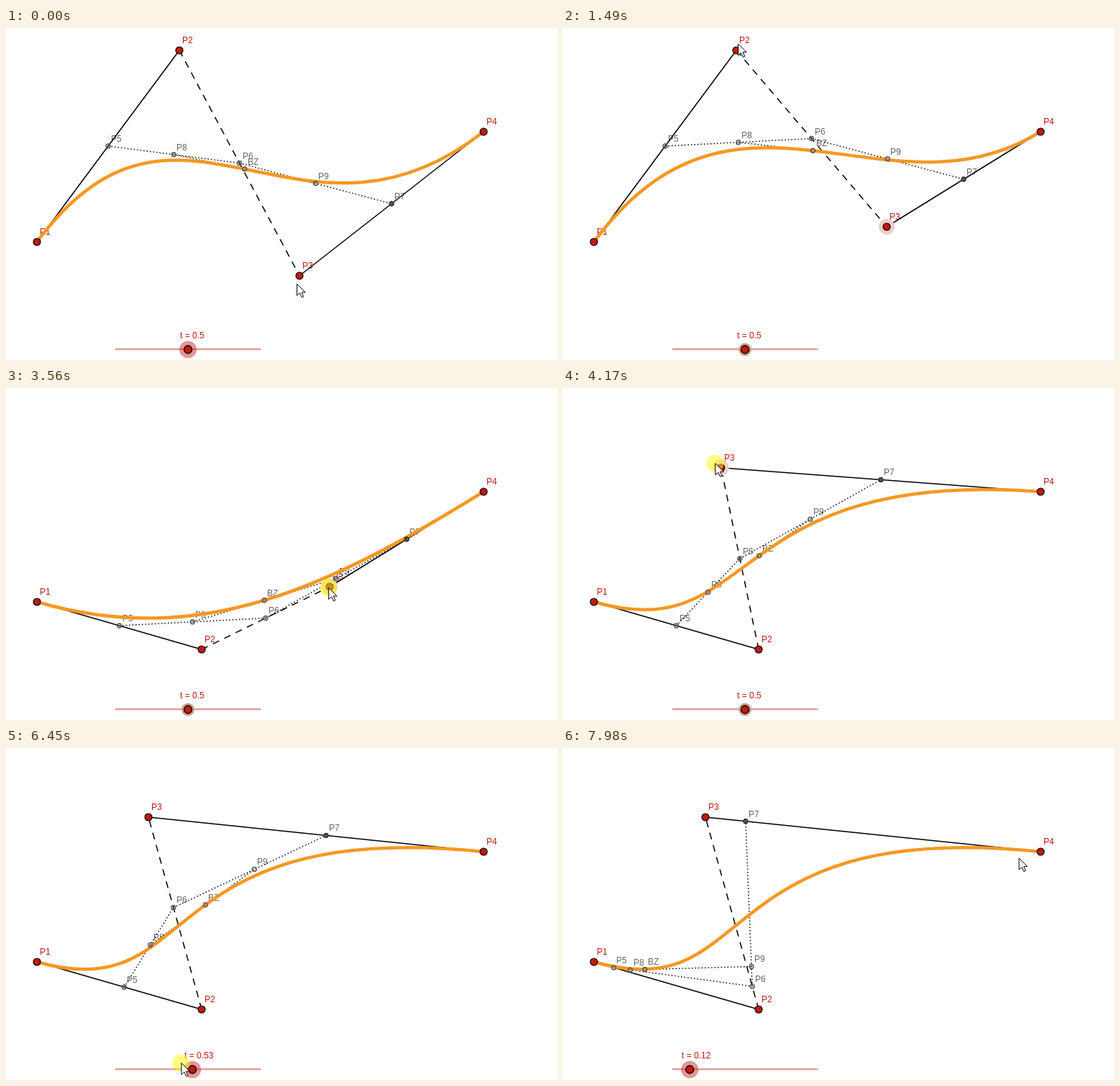
Recreate the animation shown at these times as an HTML page with a canvas. Size 766x461 px, loop 8000 ms.

```html
<!DOCTYPE html>
<html>
<head>
<meta charset="utf-8">
<style>
html, body { margin: 0; width: 100%; height: 100%; overflow: hidden; background: #fff; }
canvas { display: block; }
</style>
</head>
<body>
<canvas id="stage" width="766" height="461"></canvas>
<script>
const ctx = document.getElementById('stage').getContext('2d');
const LOOP = 8000, REST = 150, RED = '#c01a0c', GREY = '#666';
const P1 = [43, 297], P4 = [664, 144];

// Key positions: [ms, value, ...]
const tracks = {
  P2: [[1680, 241, 31], [2540, 255, 316], [2800, 272, 363]],
  P3: [[250, 408, 344], [1100, 450, 276], [3560, 450, 276], [4170, 220, 111], [4320, 198, 96]],
  t: [[5090, .5], [5630, .76], [6005, .84], [6450, .53], [7220, .12]]
};

// The hand runs ahead of the dragged point by `lead` ms and rises by `lift` px
const drags = [
  { name: 'P3', from: 300, to: 1130, lead: 15, dx: 2, dy: 2, lift: 0 },
  { name: 'P2', from: 1640, to: 2880, lead: 15, dx: 2, dy: -9, lift: -11 },
  { name: 'P3', from: 3560, to: 4400, lead: 25, dx: -1, dy: 2, lift: 4 },
  { name: 't', from: 5050, to: 7280, lead: 90, dx: -4, dy: 6, lift: 24 }
];

const smooth = u => u * u * (3 - 2 * u);
const clamp = u => Math.min(1, Math.max(0, u));
const mix = (a, b, t) => a.map((v, i) => v + (b[i] - v) * t);
const knobAt = t => [152 + 202 * t, 446.5];

// Smooth interpolation that never overshoots a turning point
function sample(track, ms) {
  const last = track.length - 1;
  if (ms <= track[0][0]) return track[0].slice(1);
  if (ms >= track[last][0]) return track[last].slice(1);
  const i = track.findIndex(k => k[0] > ms) - 1;
  const a = track[i], b = track[i + 1], h = b[0] - a[0], u = (ms - a[0]) / h;
  const slope = (k, c) => {
    if (k === 0 || k === last) return 0;
    const [p, q, r] = track.slice(k - 1, k + 2);
    return (q[c] - p[c]) * (r[c] - q[c]) <= 0 ? 0 : (r[c] - p[c]) / (r[0] - p[0]);
  };
  return mix(a, b, smooth(u)).map((v, c) =>
    v + h * u * (1 - u) * ((1 - u) * slope(i, c) - u * slope(i + 1, c))).slice(1);
}

function gripAt(drag, ms) {
  const value = sample(tracks[drag.name], ms + drag.lead);
  const [x, y] = drag.name === 't' ? knobAt(value[0]) : value;
  return [x + drag.dx, y + drag.dy - drag.lift * (ms - drag.from) / (drag.to - drag.from)];
}

function glide(a, b, from, to, ms, bend = mix(a, b, .5)) {
  const u = smooth(clamp((ms - from) / (to - from)));
  return mix(mix(a, bend, u), mix(bend, b, u), u);
}

function cursorAt(ms) {
  const held = drags.find(d => ms >= d.from && ms < d.to);
  if (held) return gripAt(held, ms);
  const next = drags.find(d => d.from > ms);
  const prev = drags.filter(d => d.to <= ms).pop();
  const start = prev ? gripAt(prev, prev.to) : [404, 355.5];
  const from = prev ? prev.to : 50;
  if (!next) return glide(start, [633.5, 153], from, 7980, ms, [108, 85]);
  return glide(start, gripAt(next, next.from), from, next.from - REST, ms);
}

function line(a, b, dash = [], color = '#000', width = 1.5) {
  ctx.setLineDash(dash);
  ctx.strokeStyle = color;
  ctx.lineWidth = width;
  ctx.beginPath();
  ctx.moveTo(...a);
  ctx.lineTo(...b);
  ctx.stroke();
  ctx.setLineDash([]);
}

function disc([x, y], r, fill, stroke, width = 1) {
  ctx.beginPath();
  ctx.arc(x, y, r, 0, Math.PI * 2);
  ctx.fillStyle = fill;
  ctx.fill();
  if (stroke) {
    ctx.strokeStyle = stroke;
    ctx.lineWidth = width;
    ctx.stroke();
  }
}

function label(text, [x, y], color, dx, dy) {
  ctx.fillStyle = color;
  ctx.fillText(text, Math.round(x + dx), Math.round(y + dy));
}

function arrow([x, y]) {
  const shape = [[0, 0], [0, 16], [4, 12.5], [6.7, 18.5], [9.2, 17.4], [6.6, 11.6], [11.5, 11.6]];
  ctx.beginPath();
  shape.forEach(([dx, dy]) => ctx.lineTo(x + .5 + dx, y + dy));
  ctx.closePath();
  ctx.fillStyle = '#fff';
  ctx.fill();
  ctx.strokeStyle = '#000';
  ctx.lineWidth = 1;
  ctx.stroke();
}

function draw(ms) {
  const P2 = sample(tracks.P2, ms), P3 = sample(tracks.P3, ms);
  const t = +sample(tracks.t, ms)[0].toFixed(2);
  const P5 = mix(P1, P2, t), P6 = mix(P2, P3, t), P7 = mix(P3, P4, t);
  const P8 = mix(P5, P6, t), P9 = mix(P6, P7, t), BZ = mix(P8, P9, t);
  const knob = knobAt(t), cursor = cursorAt(ms);
  const active = drags.filter(d => d.from <= ms).pop();
  const selected = active ? active.name : 't';

  ctx.fillStyle = '#fff';
  ctx.fillRect(0, 0, 766, 461);
  ctx.font = '12px "Liberation Sans", Arial, sans-serif';

  const corners = { P1, P2, P3, P4 }, inner = { P5, P6, P7, P8, P9, BZ };
  for (const name in corners) label(name, corners[name], RED, 4, -10);
  for (const name in inner) label(name, inner[name], GREY, 4, -6);
  label('t = ' + t, knob, RED, -11, -15.5);

  line(P1, P2);
  line(P3, P4);
  line(P2, P3, [9.5, 8]);
  [[P5, P6], [P6, P7], [P8, P9]].forEach(([a, b]) => line(a, b, [1.5, 3]));

  ctx.beginPath();
  ctx.moveTo(...P1);
  ctx.bezierCurveTo(...P2, ...P3, ...P4);
  ctx.strokeStyle = '#f79722';
  ctx.lineWidth = 4.5;
  ctx.stroke();

  line([152, 446], [354, 446], [], '#e39a98', 2.5);
  if (selected === 't') disc(knob, 12, 'rgba(200,45,45,.5)');
  else {
    disc(knob, 9, '#cb9f8a');
    disc(corners[selected], 11, '#efcfc8');
  }

  for (const name in inner) disc(inner[name], 3, 'rgba(110,110,110,.3)', '#555', 1.3);
  disc(P7, 3, '#555', '#222');
  for (const name in corners) disc(corners[name], 5, RED, '#000', 1.2);
  disc(knob, 5.5, RED, '#000', 1.3);

  if (active && ms < active.to) disc(cursor, 12, 'rgba(255,250,0,.5)');
  arrow(cursor);
}

function tick() {
  draw(performance.now() % LOOP);
  requestAnimationFrame(tick);
}
tick();
</script>
</body>
</html>
```
